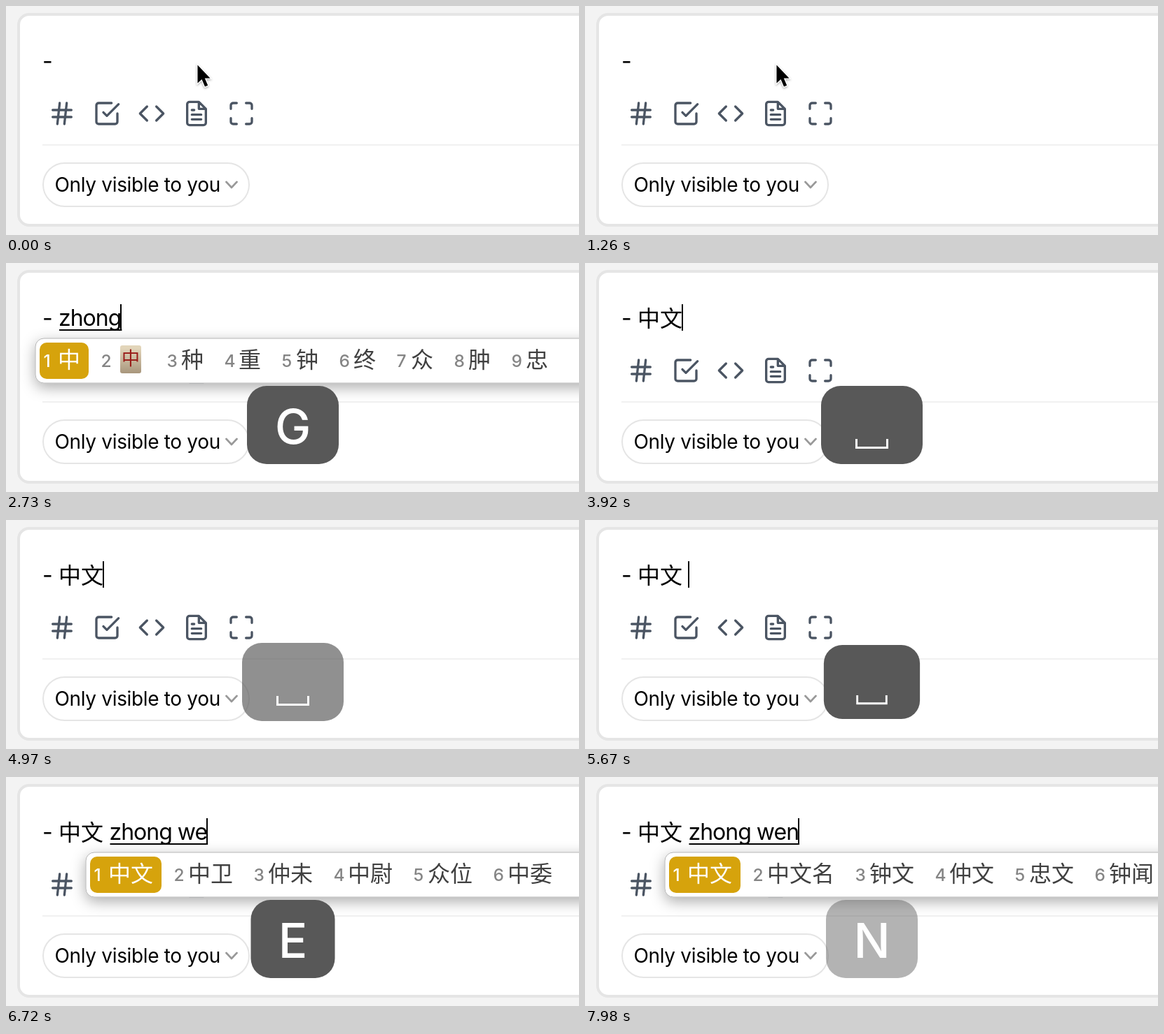
Write an HTML page that moves like this. It is 818 px wide and 328 px high and loops after 8 s.

```html
<!DOCTYPE html>
<html lang="zh-CN">
<head>
<meta charset="utf-8">
<title>Typing with an input method</title>
<style>
html, body { margin: 0; width: 100%; height: 100%; overflow: hidden; background: #f3f3f3; }
svg { display: block; width: 100%; height: 100%; }
text { font-family: Inter, Roboto, sans-serif; white-space: pre; }
.label { font-size: 28px; letter-spacing: -0.012em; }
.latin { font-size: 32px; letter-spacing: -0.031em; }
.han { font-family: "Noto Sans CJK SC", "Noto Sans CJK", "Noto Sans CJK JP", sans-serif; font-size: 32px; }
.num { font-size: 24.5px; font-weight: 500; }
.icons { fill: none; stroke: #4b5563; stroke-width: 2; stroke-linecap: round; stroke-linejoin: round; }
</style>
</head>
<body>
<svg viewBox="0 0 818 328">
  <defs>
    <filter id="shade" x="-10%" y="-80%" width="120%" height="260%">
      <feDropShadow dx="0" dy="6" stdDeviation="10" flood-color="#000" flood-opacity=".32"/>
    </filter>
    <filter id="soft" x="-50%" y="-50%" width="200%" height="200%">
      <feDropShadow dx="0" dy="1.5" stdDeviation="1.5" flood-color="#000" flood-opacity=".35"/>
    </filter>
    <linearGradient id="ivory" x2="0" y2="1">
      <stop offset=".1" stop-color="#e2d5ba"/>
      <stop offset="1" stop-color="#a8967c"/>
    </linearGradient>
  </defs>
  <rect width="818" height="328" fill="#f3f3f3"/>
  <rect x="18" y="12" width="900" height="302" rx="15" fill="#fff" stroke="#e5e5e5" stroke-width="4"/>
  <rect x="52" y="198" width="800" height="2" fill="#f1f1f1"/>
  <rect x="53" y="225" width="294" height="62" rx="31" fill="#fff" stroke="#e5e5e5" stroke-width="2"/>
  <text class="label" x="69.500" y="266">Only visible to you</text>
  <path d="M314.500 252l7.500 8 7.500-8" fill="none" stroke="#999" stroke-width="2.700" stroke-linecap="round" stroke-linejoin="round"/>
  <g id="icons" class="icons"></g>

  <text class="latin" x="52" y="90">-</text>
  <text id="done" class="han" x="75" y="91"></text>
  <text id="draft" class="latin" y="90"></text>
  <rect id="line" y="95" height="2"/>
  <rect id="caret" y="59" width="2" height="38"/>

  <g id="popup">
    <rect x="42" y="108" width="940" height="64" rx="12" fill="#fff" stroke="#b4b4b4" filter="url(#shade)"/>
    <g id="list"></g>
  </g>

  <path id="mouse" d="M273.500 84.500V110.500L279.500 105L284 115.500L288.200 113.700L283.800 103.500H291.500Z"
    stroke="#fff" stroke-width="2.200" paint-order="stroke" filter="url(#soft)"/>

  <g id="key">
    <rect id="cap" y="176" height="112" rx="28" fill="#585858"/>
    <text id="letter" x="409.500" y="259" font-size="69" font-weight="500" fill="#fff" text-anchor="middle"></text>
    <path id="bar" d="M387.500 252V264.500H431.500V252" fill="none" stroke="#fff" stroke-width="3"/>
  </g>
</svg>
<script>
const $ = id => document.getElementById(id);
const LOOP = 8000, STEP = 70, BLINK = 500, START = 75;

const icons = [
  'M4 9h16M4 15h16M10 3 8 21M16 3 14 21',
  'M9 11l3 3L22 4M21 12v7a2 2 0 0 1-2 2H5a2 2 0 0 1-2-2V5a2 2 0 0 1 2-2h11',
  'M16 18l6-6-6-6M8 6l-6 6 6 6',
  'M14 2H6a2 2 0 0 0-2 2v16a2 2 0 0 0 2 2h12a2 2 0 0 0 2-2V8zM14 2v6h6M16 13H8M16 17H8M10 9H8',
  'M8 3H5a2 2 0 0 0-2 2v3M21 8V5a2 2 0 0 0-2-2h-3M3 16v3a2 2 0 0 0 2 2h3M16 21h3a2 2 0 0 0 2-2v-3'
];
$('icons').innerHTML = icons.map((d, i) =>
  `<path transform="translate(${60 + 64 * i} 134) scale(1.6667)" d="${d}"/>`).join('');

const TILE = '🀄';
const zhong = `中 ${TILE} 种 重 钟 终 众 肿 忠`;
const words = {
  'z': '在 这 中 做 怎 只 着 种 走',
  'zh': '这 中 着 只 种 者 找 真 张',
  'zho': zhong,
  'zhon': zhong,
  'zhong': zhong,
  'zhong w': '中文 中午 中外 重温 众望 中卫',
  'zhong we': '中文 中卫 仲未 中尉 众位 中委',
  'zhong wen': '中文 中文名 钟文 仲文 忠文 钟闻'
};

// [time, committed text, text being composed]
const edits = [
  [-35, '', ''],
  [2150, '', 'z'], [2290, '', 'zh'], [2430, '', 'zho'], [2510, '', 'zhon'], [2710, '', 'zhong'],
  [3130, '', 'zhong w'], [3200, '', 'zhong we'], [3260, '', 'zhong wen'],
  [3895, '中文', ''], [5640, '中文 ', ''],
  [5800, '中文 ', 'z'], [5930, '中文 ', 'zh'], [6010, '中文 ', 'zho'], [6080, '中文 ', 'zhon'],
  [6220, '中文 ', 'zhong'], [6430, '中文 ', 'zhong w'], [6710, '中文 ', 'zhong we'], [6890, '中文 ', 'zhong wen']
];

// [time, key, pops in]
const keys = [
  [1962, 'Z', 1], [2230, 'H'], [2370, 'O'], [2440, 'N'], [2650, 'G'],
  [3070, 'W'], [3140, 'E'], [3210, 'N'], [3895, ' '],
  [5580, ' ', 1], [5735, 'Z'], [5870, 'H'], [5945, 'O'], [6015, 'N'], [6155, 'G'],
  [6365, 'W'], [6645, 'E'], [6858, 'N']
];
const capWidth = { Z: 125, H: 131, O: 134, N: 131, G: 131, W: 147, E: 120, ' ': 145 };

const clamp = v => Math.max(0, Math.min(1, v));
const latest = (rows, t) => rows.filter(r => r[0] <= t).pop();
const show = (id, on) => $(id).setAttribute('visibility', on ? 'visible' : 'hidden');
const set = (id, attrs) => { for (const k in attrs) $(id).setAttribute(k, attrs[k]); };

function listMarkup(items) {
  let x = 54;
  return items.split(' ').map((word, i) => {
    const tile = word === TILE, width = tile ? 44 : 32 * word.length;
    const at = x;
    x += width + 50;
    const back = i ? '' : `<rect x="48" y="114" width="${width + 38}" height="52" rx="10" fill="#d6a30c"/>`;
    const num = `<text class="num" x="${at - 0.5}" y="149" fill="${i ? '#858585' : '#fff'}">${i + 1}</text>`;
    const body = tile
      ? `<rect x="${at + 27}" y="118" width="30" height="40" rx="3" fill="url(#ivory)"/>
         <text class="han" x="${at + 42}" y="146" style="font-size:26px" text-anchor="middle" fill="#991b18">中</text>`
      : `<text class="han" x="${at + 20}" y="150" fill="${i ? '#404040' : '#fff'}">${word}</text>`;
    return back + num + body;
  }).join('');
}

let shown;
function drawEdit([time, done, draft], t) {
  const base = START + 32 * done.trim().length + (done.endsWith(' ') ? 8.5 : 0);
  if (shown !== time) {
    shown = time;
    $('done').textContent = done.trim();
    $('draft').textContent = draft;
    set('draft', { x: base });
    const width = draft ? $('draft').getComputedTextLength() : 0;
    set('line', { x: base + 1, width });
    set('caret', { x: Math.round(base + width - 1) });
    $('list').innerHTML = draft ? listMarkup(words[draft]) : '';
    set('popup', { transform: `translate(${Math.round(base - START - 0.5)} 0)` });
    show('popup', draft);
    show('line', draft);
    show('mouse', time < 0);
  }
  const phase = Math.floor((t - time) / BLINK) % 2;
  show('caret', time < 0 ? phase === 1 : phase === 0);
}

function drawKey(key, t) {
  show('key', key);
  show('bar', key && key[1] === ' ');
  if (!key) return;
  const [time, label, pops] = key, age = t - time;
  const grow = pops ? clamp(age / 140) : 1;
  const fade = 1 - clamp((age - 1000) / 220);
  const scale = 0.85 + 0.15 * grow, width = capWidth[label];
  set('cap', { x: 409.5 - width / 2, width });
  $('letter').textContent = label.trim();
  set('key', {
    opacity: Math.min(1, grow * 2) * fade,
    transform: `translate(409.5 232) scale(${scale}) translate(-409.5 -232)`
  });
}

function draw(ms) {
  const t = Math.floor((ms % LOOP) / STEP + 1e-6) * STEP;
  drawEdit(latest(edits, t), t);
  drawKey(latest(keys, t), t);
}

const begin = performance.now();
function tick() {
  draw(performance.now() - begin);
  requestAnimationFrame(tick);
}
tick();
</script>
</body>
</html>
```
